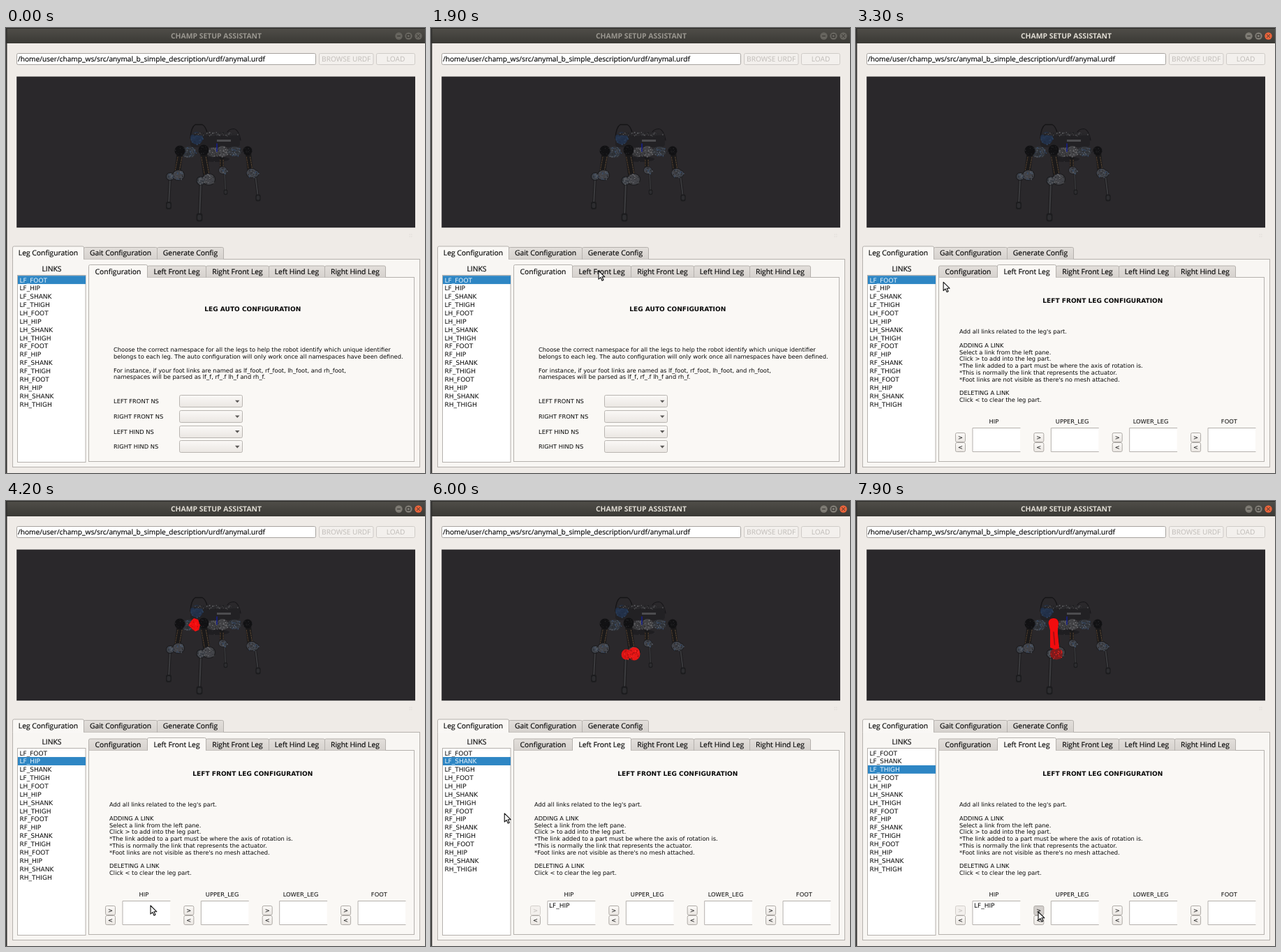
An HTML page for the animation above (8 s loop, 600x638 px).

```html
<!DOCTYPE html>
<html lang="en">
<head>
<meta charset="utf-8">
<title>Setup assistant</title>
<style>
html, body { margin: 0; width: 100%; height: 100%; overflow: hidden; background: #efebe7; }
svg { display: block; width: 600px; height: 638px; }
text { font: 8.33px "DejaVu Sans", sans-serif; fill: #080808; text-rendering: geometricPrecision; white-space: pre; }
.ui { font: 10.35px "Open Sans", "Noto Sans", sans-serif; stroke: #080808; stroke-width: 0.18px; }
.path { font-size: 10.17px; }
.title { font-weight: 700; font-size: 10.4px; stroke: none; }
.head { font-weight: 700; font-size: 9.05px; }
.item { font-size: 9px; }
.mid { text-anchor: middle; }
.off { fill: #bfbbb7; stroke: none; }
</style>
</head>
<body>
<svg id="stage" viewBox="0 0 600 638">
  <defs>
    <linearGradient id="bar" x2="0" y2="1"><stop stop-color="#504e49"/><stop offset="1" stop-color="#3a3935"/></linearGradient>
    <linearGradient id="tab" x2="0" y2="1"><stop stop-color="#e3dfdb"/><stop offset="1" stop-color="#d6d2ce"/></linearGradient>
    <linearGradient id="button" x2="0" y2="1"><stop stop-color="#fbf9f7"/><stop offset="1" stop-color="#eae6e2"/></linearGradient>
  </defs>
  <g id="frame"></g>
  <g id="robot"></g>
  <g id="marks"></g>
  <g id="list"></g>
  <g id="tabs"></g>
  <g id="auto"></g>
  <g id="leg"></g>
  <path id="cursor" d="M0 0V12.2L2.9 9.6L5 14.2L7 13.3L5 8.8H8.9Z" fill="#f8f8f8" stroke="#111" stroke-width="1.1" stroke-linejoin="round"/>
</svg>
<script>
const LOOP = 8000, STEP = 100;
const EVENTS = { tab: 2100, hip: 3800, add: 4800, thigh: 6500, hover: 7700 };
const $ = id => document.getElementById(id);

const text = (x, y, value, cls = '', extra = '') =>
  `<text x="${x}" y="${y}" class="${cls}" ${extra}>${value.replace(/</g, '&lt;').replace(/>/g, '&gt;')}</text>`;
const box = (x, y, w, h, fill, stroke = 'none', r = 0) =>
  `<rect x="${x}" y="${y}" width="${w}" height="${h}" rx="${r}" fill="${fill}" stroke="${stroke}"/>`;
const line = (d, stroke, width = 1, extra = '') =>
  `<path d="${d}" fill="none" stroke="${stroke}" stroke-width="${width}" stroke-linecap="round" ${extra}/>`;
const disc = (x, y, rx, fill, ry = rx) =>
  `<ellipse cx="${x}" cy="${y}" rx="${rx}" ry="${ry}" fill="${fill}"/>`;

let seed = 7;
const random = () => (seed = (seed * 16807) % 2147483647) / 2147483647;

// Scatters small mesh specks inside an ellipse.
function specks(x, y, rx, ry, count, colors) {
  let out = '';
  for (let i = 0; i < count; i++) {
    const a = random() * Math.PI * 2, r = Math.sqrt(random());
    const size = 0.7 + random() * 0.8;
    out += box((x + rx * r * Math.cos(a)).toFixed(1), (y + ry * r * Math.sin(a)).toFixed(1),
      size.toFixed(1), size.toFixed(1), colors[i % colors.length]);
  }
  return out;
}
const GREYS = ['#6a6a6d', '#505053', '#28282a', '#7c7c7f'];
const BLUES = ['#334a6b', '#505a68', '#232429', '#5f656e'];
const part = (x, y, rx, ry, fill, count, colors) =>
  disc(x, y, rx, fill, ry) + specks(x, y, rx, ry, count, colors);

function limb(hip, knee, ankle, foot, scale, colors) {
  const [hx, hy] = hip, [kx, ky] = knee, [ax, ay] = ankle, [fx, fy] = foot;
  return line(`M${hx} ${hy}L${kx} ${ky}`, '#1a191a', 9 * scale) +
    line(`M${hx - 3 * scale} ${hy + 5}L${kx - 3 * scale} ${ky - 5}`, '#5c4630', 0.9, 'stroke-dasharray="2 1.5"') +
    line(`M${hx + 3 * scale} ${hy + 5}L${kx + 3 * scale} ${ky - 5}`, '#665039', 0.9, 'stroke-dasharray="2 1.5"') +
    line(`M${ax} ${ay}L${fx} ${fy}`, '#1d1c1e', 4 * scale) +
    line(`M${ax} ${ay}L${fx} ${fy}`, '#3c3c3f', 2 * scale) +
    box(fx - 4 * scale, fy - 5 * scale, 8 * scale, 11 * scale, '#1c1c1e', 'none', 3 * scale) +
    box(fx - 2.5 * scale, fy - 3 * scale, 5 * scale, 7 * scale, '#2d2d30', 'none', 2 * scale) +
    disc(kx + 2 * scale, ky, 9 * scale, '#1b1b1d', 8 * scale) + disc(ax, ay - 2, 6 * scale, '#1b1b1d') +
    part(kx + 2 * scale, ky, 8 * scale, 7 * scale, '#414247', 34 * scale, colors) +
    part(ax, ay - 2, 5 * scale, 5 * scale, '#3d4148', 18 * scale, colors);
}

function drawRobot() {
  const body = line('M264 158Q265 142 271 138.5H281Q286 141 288 150', '#151416', 1.3) +
    line('M316 151Q319 144.5 326 144.5Q333 145 336 161', '#18171a', 1.2) +
    box(264, 151, 71, 20, '#222124', 'none', 5) +
    part(273, 158, 9, 9, '#22314a', 30, ['#2d4a70', '#1c2534', '#34465e']) +
    part(300, 152, 34, 3, '#29282b', 54, ['#737376', '#505053', '#1a191b']) +
    part(300, 188, 20, 4, '#1f1e21', 8, ['#303033']) +
    box(302, 160, 20, 3, '#4c4c4f');
  const back = limb([309, 184], [309, 204], [313, 207], [314.5, 235], 0.7, BLUES) +
    limb([347, 180], [350, 208], [357, 211], [361, 243], 0.9, BLUES);
  const drives = part(262, 178, 10, 8, '#30343a', 60, BLUES) +
    part(297, 178, 9, 7, '#39393c', 46, GREYS) +
    part(310, 177, 8, 8, '#414144', 52, GREYS) +
    part(327, 177, 10, 7, '#33363b', 60, BLUES) +
    line('M302 166V177', '#17208c', 1.6);
  const front = limb([249, 180], [245, 211], [235, 215], [233, 254], 1, BLUES) +
    limb([283, 180], [288, 217], [279, 221], [277, 271], 1.1, GREYS);
  const joints = [[249, 176, 7.5], [283, 175, 7.5], [346, 176, 6.5]]
    .map(([x, y, r]) => part(x, y, r, r, '#111113', 16, ['#29292c', '#1d1d1f'])).join('');
  $('robot').innerHTML = body + back + drives + front + joints;
}

const RED = '#f20c0e', REDS = ['#b90b0b', '#ff2d24', '#8e1717'];
const highlights = {
  none: '',
  hip: `<path d="M261 178L266 171L269 168L275 170L278 178L276 185L271 187L266 183Z" fill="${RED}"/>` +
    specks(270, 178, 8, 8, 18, REDS),
  shank: disc(279.5, 220, 7, '#dc1414', 7.5) + disc(291, 219, 8.5, '#e61616', 9.5) +
    specks(286, 219, 12, 8, 60, REDS),
  thigh: disc(287, 219, 9, '#7c1c1e', 8.5) + specks(287, 219, 9, 8, 46, REDS) +
    `<path d="M275.5 175Q276 168 283 168Q290 168 290 176Q288.5 183 289 190L291 211L285 213L278 210L278 185Z" fill="${RED}"/>` +
    line('M283 188L284.5 206', '#9c1013', 1.6)
};

function drawFrame(active) {
  const button = (x, w, label) => box(x, 36.5, w, 16, '#f3f0ed', '#cfcbc7', 2) +
    text(x + w / 2, 48.3, label, 'ui path mid off');
  const controls = [562.5, 576.5, 590.5].map((x, i) => {
    const close = active && i === 2;
    const fill = close ? '#e9633a' : active ? '#7d7a73' : '#66645e';
    const mark = [`M${x - 2} 11.5H${x + 2}`, `M${x - 2} 9.5H${x + 2}V13.5H${x - 2}Z`,
      `M${x - 2} 9.5L${x + 2} 13.5M${x + 2} 9.5L${x - 2} 13.5`][i];
    return disc(x, 11.5, 5.2, fill) + line(mark, '#35332f', 1);
  }).join('');
  $('frame').innerHTML = box(0, 0, 600, 638, '#efebe7') + box(0, 0, 600, 22, 'url(#bar)') +
    box(0, 0, 600, 1, '#2b2a27') + box(0, 0, 1.5, 638, '#2d2c2b') +
    text(301, 15, 'CHAMP SETUP ASSISTANT', 'ui title mid', `style="fill:${active ? '#dfdbd2' : '#99968f'}"`) +
    controls + box(15.5, 36.5, 428, 16, '#fff', '#a7a39f', 2) +
    text(17, 48.1, '/home/user/champ_ws/src/anymal_b_simple_description/urdf/anymal.urdf', 'ui path') +
    button(448.5, 77.5, 'BROWSE URDF') + button(530.5, 55, 'LOAD') +
    box(15.2, 69.6, 570.8, 216.6, '#2a282b') +
    line('M578 296H583M578 299H583', '#d9d5d1', 1, 'stroke-dasharray="0.5 2"');
}

function tabRow(top, bottom, edges, labels, selected, baseline) {
  const draw = i => {
    const on = i === selected, y = on ? top - 1 : top + 0.5;
    const x = edges[i], w = edges[i + 1] - x;
    return `<path d="M${x} ${bottom}V${y + 2}q0-2 2-2H${x + w - 2}q2 0 2 2V${bottom}" fill="${on ? '#faf8f5' : 'url(#tab)'}" stroke="#b5b1ad"/>` +
      text(x + w / 2, baseline, labels[i], 'ui mid');
  };
  const order = labels.map((_, i) => i).filter(i => i !== selected);
  const x = edges[selected], w = edges[selected + 1] - x;
  return order.map(draw).join('') + draw(selected) + box(x + 0.5, bottom - 1, w - 1, 2, '#faf8f5');
}

function drawTabs(selected) {
  $('tabs').innerHTML = box(118.5, 357.5, 466, 264, '#faf8f5', '#b5b1ad') +
    tabRow(340.5, 357.5, [118.5, 202.5, 286.5, 376.5, 456.5, 543.5],
      ['Configuration', 'Left Front Leg', 'Right Front Leg', 'Left Hind Leg', 'Right Hind Leg'], selected, 353.3);
}

const LINKS = ['LF', 'LH', 'RF', 'RH'].flatMap(leg =>
  ['FOOT', 'HIP', 'SHANK', 'THIGH'].map(name => `${leg}_${name}`));

function drawList(selected, added) {
  const rows = LINKS.filter(name => !added || name !== 'LF_HIP').map((name, i) => {
    const y = 355.2 + i * 11.87, on = name === selected;
    return (on ? box(17, y, 97, 11.9, '#2e86c4') : '') +
      text(19.5, (y + 9.3).toFixed(2), name, 'item', on ? 'style="fill:#e8f3fb"' : '');
  }).join('');
  $('list').innerHTML = box(9.5, 331.5, 583, 298, '#f8f6f3', '#b5b1ad') +
    tabRow(314, 331.5, [9.5, 111.5, 216.5, 311.5],
      ['Leg Configuration', 'Gait Configuration', 'Generate Config'], 0, 326.4) +
    text(65.5, 348.6, 'LINKS', 'ui mid') + box(16.5, 354.5, 97.5, 268, '#fff', '#b5b1ad') + rows;
}

function drawAuto() {
  const combos = ['LEFT FRONT NS', 'RIGHT FRONT NS', 'LEFT HIND NS', 'RIGHT HIND NS'].map((name, i) => {
    const y = 535.2 + i * 21.7;
    return text(154, y + 3, name) + box(248.5, Math.round(y - 9) + 0.5, 90, 17, 'url(#button)', '#b9b5b1', 2) +
      `<path d="M328 ${y - 1.5}h6.5l-3.25 3.6z" fill="#5b5957"/>`;
  }).join('');
  $('auto').innerHTML = text(353.3, 406.4, 'LEG AUTO CONFIGURATION', 'head mid') +
    ['Choose the correct namespace for all the legs to help the robot identify which unique identifier',
      'belongs to each leg. The auto configuration will only work once all namespaces have been defined.', '',
      'For instance, if your foot links are named as lf_foot, rf_foot, lh_foot, and rh_foot,',
      'namespaces will be parsed as lf_f, rf_.f lh_f and rh_f.']
      .map((s, i) => text(154, 464.2 + i * 9.77, s)).join('') + combos;
}

function drawLeg(added, hovered) {
  const button = (x, y, label, off, dark) =>
    box(x + 0.5, y + 0.5, 14, 13, dark ? '#d2cecb' : off ? '#f3f0ed' : 'url(#button)', off ? '#d3cfcb' : '#aeaaa6', 2) +
    text(x + 7.5, y + 10, label, `mid ${off ? 'off' : ''}`);
  const columns = ['HIP', 'UPPER_LEG', 'LOWER_LEG', 'FOOT'].map((name, i) => {
    const x = i * 112.35;
    return text(197.3 + x, 567, name, 'mid') + box(167 + x, 573, 68, 35, '#fff') +
      line(`M${235 + x} 573.5H${167 + x}V607.5H${235 + x}`, '#b5b1ad') +
      button(142 + x, 580, '>', added && i === 0, hovered && i === 1) + button(142 + x, 594, '<');
  }).join('');
  $('leg').innerHTML = text(353.3, 393.8, 'LEFT FRONT LEG CONFIGURATION', 'head mid') +
    ["Add all links related to the leg's part.", '', 'ADDING A LINK', 'Select a link from the left pane.',
      'Click > to add into the leg part.', '*The link added to a part must be where the axis of rotation is.',
      '*This is normally the link that represents the actuator.',
      "*Foot links are not visible as there's no mesh attached.", '', 'DELETING A LINK',
      'Click < to clear the leg part.']
      .map((s, i) => text(148, 438.2 + i * 9.78, s)).join('') +
    columns + (added ? text(169, 582.5, 'LF_HIP', 'item') : '');
}

// time, x, y of the pointer tip
const POINTER = [
  [700, 560, 300], [1100, 240, 345], [1200, 235, 346], [1900, 240, 348], [2800, 240, 348],
  [3600, 72, 372], [3900, 72, 372], [4200, 207, 580], [4600, 150, 586], [5500, 150, 586],
  [6300, 84.5, 384], [7200, 84.5, 384], [7700, 261, 589], [8000, 261, 589]
];

function movePointer(t) {
  const next = POINTER.findIndex(p => p[0] > t);
  $('cursor').setAttribute('visibility', next > 0 ? 'visible' : 'hidden');
  if (next < 1) return;
  const [a, b] = [POINTER[next - 1], POINTER[next]];
  const k = (t - a[0]) / (b[0] - a[0]), ease = k * k * (3 - 2 * k);
  $('cursor').setAttribute('transform',
    `translate(${a[1] + (b[1] - a[1]) * ease} ${a[2] + (b[2] - a[2]) * ease})`);
}

let shown = '';
function render(now) {
  const t = Math.floor((now % LOOP) / STEP) * STEP;
  const past = name => t >= EVENTS[name];
  const mark = past('thigh') ? 'thigh' : past('add') ? 'shank' : past('hip') ? 'hip' : 'none';
  const state = [past('tab'), mark, past('hover')].join();
  if (state !== shown) {
    shown = state;
    const added = past('add');
    drawFrame(past('tab'));
    $('marks').innerHTML = highlights[mark];
    drawList(mark === 'none' ? 'LF_FOOT' : `LF_${mark.toUpperCase()}`, added);
    drawTabs(past('tab') ? 1 : 0);
    drawLeg(added, past('hover'));
    $('auto').style.display = past('tab') ? 'none' : '';
    $('leg').style.display = past('tab') ? '' : 'none';
  }
  movePointer(t);
}

drawRobot();
drawAuto();
const start = performance.now();
function tick() {
  render(performance.now() - start);
  requestAnimationFrame(tick);
}
tick();
</script>
</body>
</html>
```
